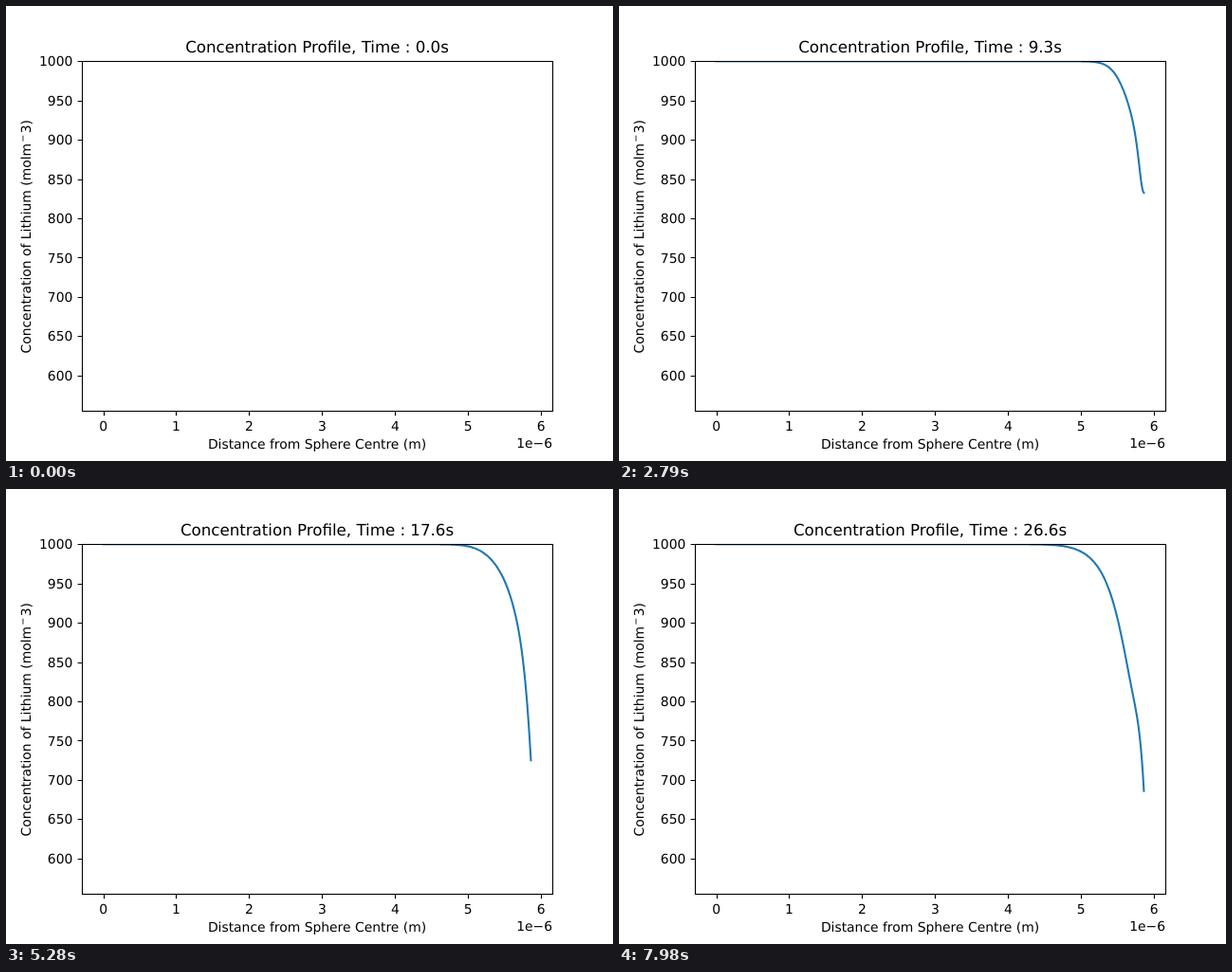
Animation of 640 by 480 pixels, one loop 8000 ms. Source, as an HTML page:

```html
<!DOCTYPE html>
<html lang="en">
<head>
<meta charset="utf-8">
<title>Concentration Profile</title>
<style>
  html, body { margin: 0; width: 100%; height: 100%; overflow: hidden; background: #fff; }
  svg { display: block; width: 640px; height: 480px; }
  text { font-family: "DejaVu Sans", sans-serif; font-size: 13.89px; fill: #000; text-rendering: geometricPrecision; white-space: pre; }
  #title { font-size: 16.67px; }
  .axis { fill: none; stroke: #000; stroke-width: 1.11; }
  #curve { fill: none; stroke: #1f77b4; stroke-width: 2.083; stroke-linecap: square; stroke-linejoin: round; }
</style>
</head>
<body>
<svg viewBox="0 0 640 480">
  <defs><clipPath id="plot"><rect x="80" y="58" width="496" height="369"/></clipPath></defs>
  <path id="curve" clip-path="url(#plot)"/>
  <path id="ticks" class="axis"/>
  <rect class="axis" x="80.5" y="58.5" width="496" height="369"/>
  <g id="labels"></g>
  <text id="title" x="328" y="49" text-anchor="middle"></text>
  <text x="328" y="467" text-anchor="middle">Distance from Sphere Centre (m)</text>
  <text x="576" y="466" text-anchor="end">1e−6</text>
  <text transform="translate(26 366.5) rotate(-90)">Concentration of Lithium (molm<tspan dx="1.3" dy="-5.2" font-size="9.72">−</tspan><tspan dx="1.3" dy="5.2">3)</tspan></text>
</svg>
<script>
const $ = id => document.getElementById(id);
const LOOP = 8000, STEP = 30;
const X0 = 102.55, X1 = 553.45, Y0 = 58.25;
const DIFF = 26;      // diffusivity, px² per second
const FLUX = 17.5;    // surface gradient while current flows
const REACH = 150;    // depth of the profile that can change, px

// Current pulses: start, end (s), strength
const pulses = [
  [1.72, 3.78, 1], [4.895, 6.2, 1], [8.2, 9.13, 1], [11.7, 12.04, 1], [13.96, 15.45, 1],
  [16.3, 17.75, 1], [17.75, 20.33, 0.35], [20.33, 23.6, 0.97], [26.09, 28, 1]
];

function erfc(z) {
  const t = 1 / (1 + 0.3275911 * z);
  const poly = t * (0.254829592 + t * (-0.284496736 + t * (1.421413741 + t * (-1.453152027 + t * 1.061405429))));
  return poly * Math.exp(-z * z);
}

// Depletion at depth d, s seconds after a unit flux is switched on
function response(d, s) {
  if (s <= 0) return 0;
  const len = 2 * Math.sqrt(DIFF * s), z = d / len;
  return len * Math.exp(-z * z) / Math.sqrt(Math.PI) - d * erfc(z);
}

function depletion(d, t) {
  let sum = 0;
  for (const [on, off, k] of pulses) sum += k * (response(d, t - on) - response(d, t - off));
  return FLUX * Math.max(0, sum);
}

function drawAxes() {
  const snap = v => Math.floor(v + 0.5) + 0.5;
  let ticks = "", labels = "";
  for (let i = 0; i <= 6; i++) {
    const x = X0 + 76.94 * i;
    ticks += `M${snap(x)} 427.5v4.86`;
    labels += `<text x="${x}" y="448" text-anchor="middle">${i}</text>`;
  }
  for (let i = 0; i <= 8; i++) {
    const y = Y0 + 41.42 * i;
    ticks += `M80.5 ${snap(y)}h-4.86`;
    labels += `<text x="70.3" y="${Math.round(y + 5.2)}" text-anchor="end">${1000 - 50 * i}</text>`;
  }
  $("ticks").setAttribute("d", ticks);
  $("labels").innerHTML = labels;
}

let shown = -1;
function draw(ms) {
  const n = Math.floor((ms % LOOP) / STEP);
  if (n === shown) return;
  shown = n;
  const t = n / 10;
  $("title").textContent = `Concentration Profile, Time : ${t.toFixed(1)}s`;
  let path = `M${X0} ${Y0}`;
  for (let d = REACH; d >= 0; d--) {
    path += `L${(X1 - d).toFixed(2)} ${(Y0 + depletion(d, t)).toFixed(2)}`;
  }
  $("curve").setAttribute("d", n ? path : "");
}

drawAxes();
draw(0);
const start = performance.now();
(function tick() {
  draw(performance.now() - start);
  requestAnimationFrame(tick);
})();
</script>
</body>
</html>
```
